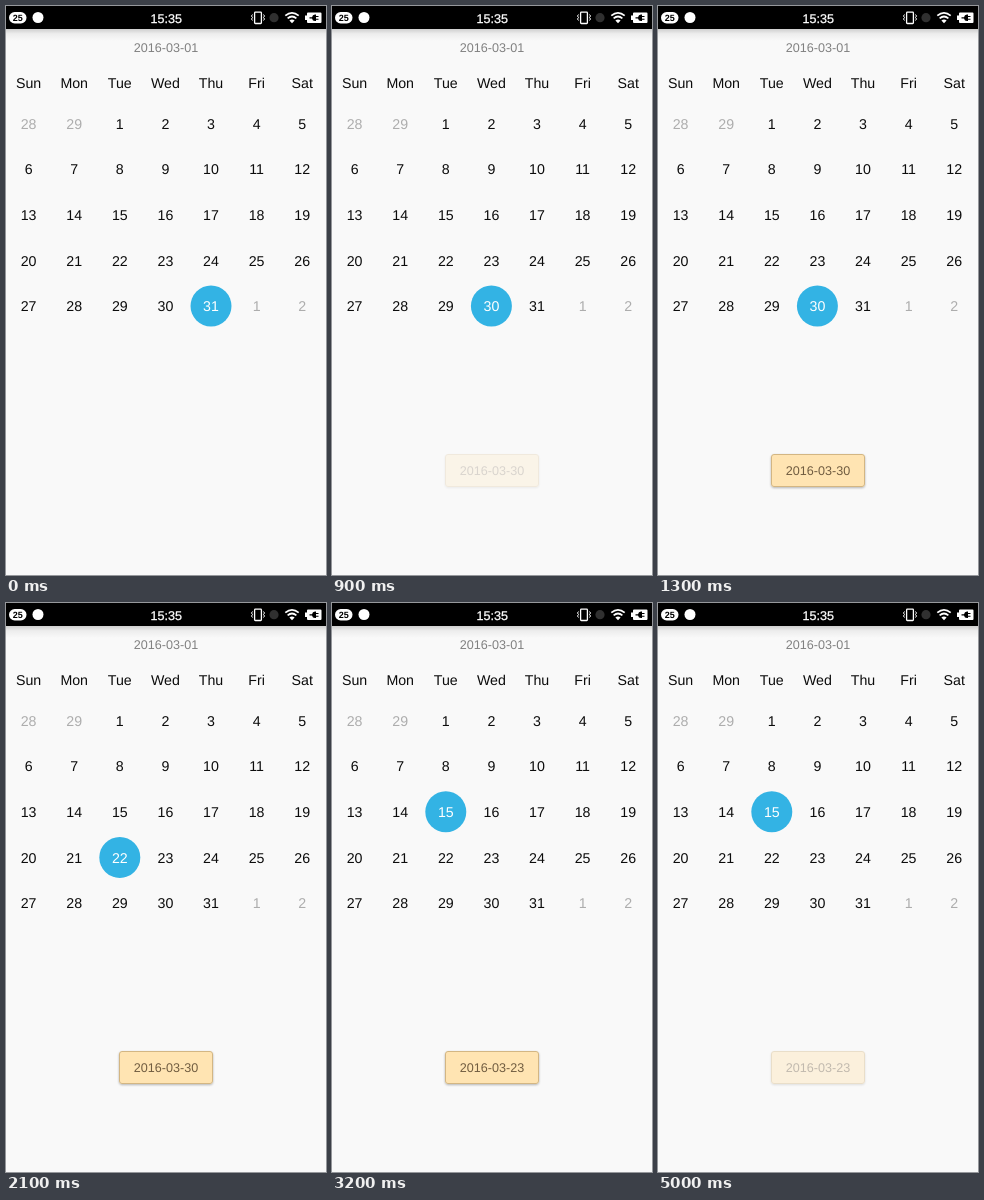
An HTML page that plays this animation: 320x569 px, repeating every 5100 ms.

```html
<!DOCTYPE html>
<html lang="en">
<head>
<meta charset="utf-8">
<title>Calendar</title>
<style>
html, body { margin: 0; width: 100%; height: 100%; overflow: hidden; background: #f9f9f9; }
svg { display: block; width: 100vw; height: 100vh; }
text { font-family: "Liberation Sans", Arial, sans-serif; text-anchor: middle; text-rendering: geometricPrecision; }
.day { font-size: 14.2px; fill: #0c0c0c; }
.off { fill: #adadad; }
.date { font-size: 12.6px; fill: #808080; }
.pick circle { fill: #33b3e4; }
.pick text { fill: #fff; }
.toast rect { fill: #ffe4b2; stroke: #d3b683; }
.toast .date { fill: #705c40; }

/* One loop is 5100 ms, 100 ms = 1.961% */
.pick, .toast { opacity: 0; animation: 5100ms step-end infinite; }
.d31 { animation-name: d31; }
.d30 { animation-name: d30; }
.d22 { animation-name: d22; }
.d15 { animation-name: d15; }
.first { animation-name: first; }
.second { animation-name: second; }
@keyframes d31 { 0% { opacity: 1 } 15.686%, 100% { opacity: 0 } }
@keyframes d30 { 0% { opacity: 0 } 15.686% { opacity: 1 } 41.176%, 100% { opacity: 0 } }
@keyframes d22 { 0% { opacity: 0 } 41.176% { opacity: 1 } 49.019%, 100% { opacity: 0 } }
@keyframes d15 { 0% { opacity: 0 } 49.019%, 100% { opacity: 1 } }
@keyframes first {
  0% { opacity: 0 }
  17.647% { opacity: .23 } 19.607% { opacity: .61 } 21.568% { opacity: .86 } 23.529% { opacity: .98 } 25.49% { opacity: 1 }
  54.901% { opacity: .98 } 56.862% { opacity: .86 } 58.823% { opacity: .61 } 60.784% { opacity: .23 } 62.745%, 100% { opacity: 0 }
}
@keyframes second {
  0% { opacity: 0 }
  54.901% { opacity: .23 } 56.862% { opacity: .61 } 58.823% { opacity: .86 } 60.784% { opacity: .98 } 62.745% { opacity: 1 }
  96.078% { opacity: .66 } 98.039%, 100% { opacity: .4 }
}
</style>
</head>
<body>
<svg id="stage" viewBox="0 0 320 569" preserveAspectRatio="none">
  <defs>
    <linearGradient id="shade" x2="0" y2="1">
      <stop offset="0" stop-color="#000" stop-opacity=".17"/>
      <stop offset=".4" stop-color="#000" stop-opacity=".05"/>
      <stop offset="1" stop-color="#000" stop-opacity="0"/>
    </linearGradient>
    <filter id="drop" x="-10%" y="-20%" width="120%" height="150%">
      <feDropShadow dx="0" dy="1" stdDeviation="1.2" flood-color="#000" flood-opacity=".28"/>
    </filter>
  </defs>
  <rect width="320" height="569" fill="#f9f9f9"/>
  <rect y="23" width="320" height="12" fill="url(#shade)"/>

  <!-- status bar -->
  <rect width="320" height="23" fill="#000"/>
  <rect x="3" y="6" width="17.5" height="11.5" rx="5.7" fill="#fff"/>
  <text x="11.7" y="15" font-size="9" font-weight="bold">25</text>
  <circle cx="32" cy="11.5" r="5.5" fill="#fff"/>
  <text x="160.2" y="16.6" font-size="12.6" fill="#fff" stroke="#fff" stroke-width=".3">15:35</text>
  <g fill="none" stroke="#fff">
    <rect x="248.6" y="6.1" width="6.8" height="11.4" rx=".8" stroke-width="1.3"/>
    <path d="M246.5 8.5l-1 1.5 1 1.5-1 1.5 1 1.5M257.5 8.5l1 1.5-1 1.5 1 1.5-1 1.5"/>
    <path d="M279.3 9.6q6.7-5.6 13.4 0M281.6 12.3q4.4-3.6 8.8 0" stroke-width="1.7"/>
  </g>
  <path d="M283.4 14.4q2.6-2 5.2 0l-2.6 2.8z" fill="#fff"/>
  <circle cx="268" cy="11.7" r="4.6" fill="#303030"/>
  <path d="M302 6.5h12.5q1 0 1 1v8.500q0 1-1 1H302q-1 0-1-1v-2h-2v-4.500h2v-2q0-1 1-1z" fill="#fff"/>
  <path d="M303.500 11.200h2.500q.5-2.600 3-2.600h1v1.300h2.500v1h-2.500v1.800h2.500v1h-2.500v1.300h-1q-2.500 0-3-2.600h-2.500z" fill="#000"/>

  <text class="date" x="160" y="46">2016-03-01</text>
</svg>
<script>
const stage = document.getElementById('stage');
const step = 45.6;
const colX = c => 22.6 + step * c;
const rowY = r => 117.6 + step * r;

function add(parent, tag, attrs, text = '') {
  const el = document.createElementNS('http://www.w3.org/2000/svg', tag);
  for (const k in attrs) el.setAttribute(k, attrs[k]);
  el.textContent = text;
  return parent.appendChild(el);
}

function label(parent, x, y, text, cls = 'day') {
  add(parent, 'text', { x, y: y + 5.2, class: cls }, text);
}

['Sun', 'Mon', 'Tue', 'Wed', 'Thu', 'Fri', 'Sat'].forEach((name, c) => label(stage, colX(c), 76.8, name));

for (let i = 0; i < 35; i++) {
  const n = i - 1;
  const inMonth = n >= 1 && n <= 31;
  const shown = n < 1 ? n + 29 : n > 31 ? n - 31 : n;
  label(stage, colX(i % 7), rowY(Math.floor(i / 7)), shown, inMonth ? 'day' : 'day off');
}

for (const n of [31, 30, 22, 15]) {
  const cx = colX((n + 1) % 7), cy = rowY(Math.floor((n + 1) / 7));
  const pick = add(stage, 'g', { class: 'pick d' + n });
  add(pick, 'circle', { cx, cy, r: 20.5 });
  label(pick, cx, cy, n);
}

for (const [cls, date] of [['first', '2016-03-30'], ['second', '2016-03-23']]) {
  const toast = add(stage, 'g', { class: 'toast ' + cls });
  add(toast, 'rect', { x: 113.5, y: 448.5, width: 93, height: 32, rx: 2.5, filter: 'url(#drop)' });
  add(toast, 'text', { x: 160, y: 469, class: 'date' }, date);
}
</script>
</body>
</html>
```
